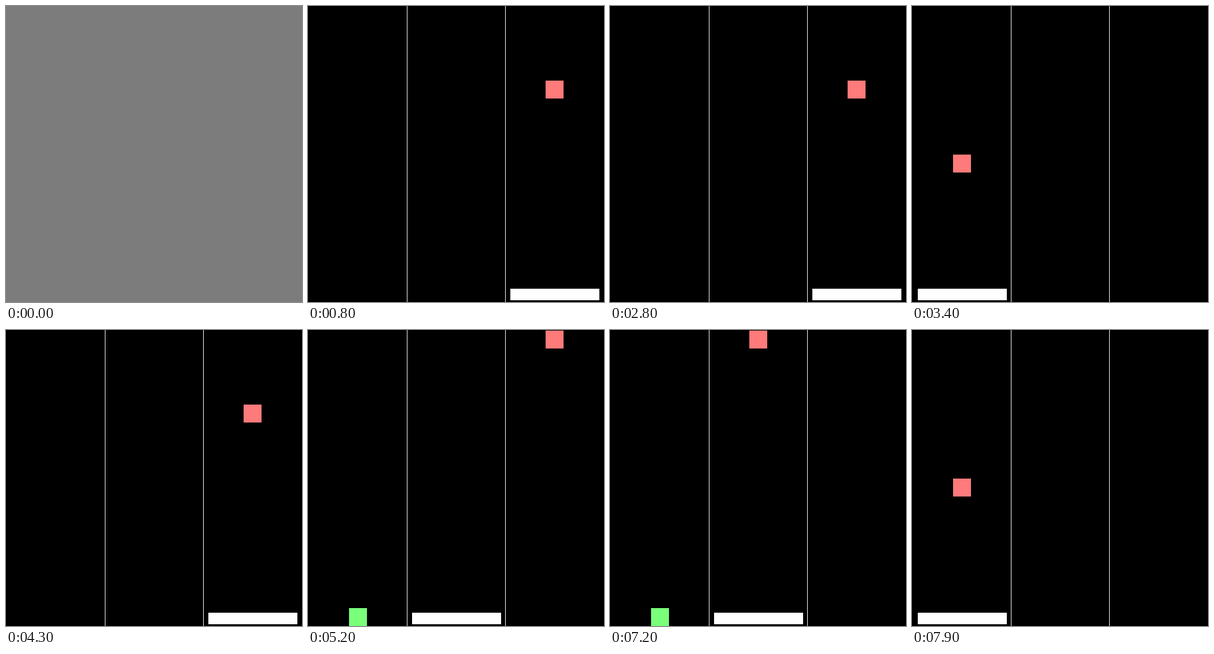
Recreate the animation shown at these times as an HTML page. Size 512 px wide and 512 px high, loop 8000 ms.

```html
<!DOCTYPE html>
<html lang="en">
<head>
<meta charset="utf-8">
<title>Catch</title>
<style>
  html, body { margin: 0; width: 100%; height: 100%; overflow: hidden; background: #000; }
  svg { display: block; width: 100vw; height: 100vh; }
</style>
</head>
<body>
<svg viewBox="0 0 512 512" shape-rendering="crispEdges">
  <rect width="512" height="512" fill="#000"/>
  <rect x="171" width="1" height="512" fill="#fff"/>
  <rect x="341" width="1" height="512" fill="#fff"/>
  <rect id="paddle" y="489" width="154" height="20" fill="#fff"/>
  <rect id="caught" y="481" width="31" height="31" fill="#7aff7a"/>
  <rect id="block" width="31" height="31" fill="#ff7a7a"/>
  <rect id="cover" width="512" height="512" fill="#7c7c7c"/>
</svg>
<script>
  const TICK = 100, TICKS = 80, ROUND = 5, FIRST = 2, PITCH = 170;
  const lanes = [1, 2, 1, 1, 1, 2, 0, 1, 2, 0, 2, 2, 1, 0, 1, 0];
  const [paddle, caught, block, cover] =
    ['paddle', 'caught', 'block', 'cover'].map(id => document.getElementById(id));

  const show = (el, on) => el.setAttribute('visibility', on ? 'visible' : 'hidden');
  const setLane = (el, left, lane) => el.setAttribute('x', left + PITCH * lane);

  function draw(tick) {
    const round = Math.floor((tick - FIRST) / ROUND);
    const step = tick - FIRST - round * ROUND;
    const playing = round >= 0;
    const lane = playing ? lanes[round] : 1;
    const last = round > 0 ? lanes[round - 1] : 1;

    // The paddle moves at most one lane per tick.
    setLane(paddle, 10, step ? lane : last + Math.sign(lane - last));

    // The block falls four rows per tick and stops on the bottom row.
    setLane(block, 71, lane);
    block.setAttribute('y', 1 + 32 * Math.min(step * 4, 15));
    show(block, playing);

    // A caught block turns green while the next one appears.
    setLane(caught, 71, last);
    show(caught, round > 0 && step === 0);
    show(cover, tick === 0);
  }

  const start = performance.now();
  function frame() {
    const elapsed = Math.max(0, performance.now() - start);
    draw(Math.floor(elapsed / TICK) % TICKS);
    requestAnimationFrame(frame);
  }
  frame();
</script>
</body>
</html>
```
